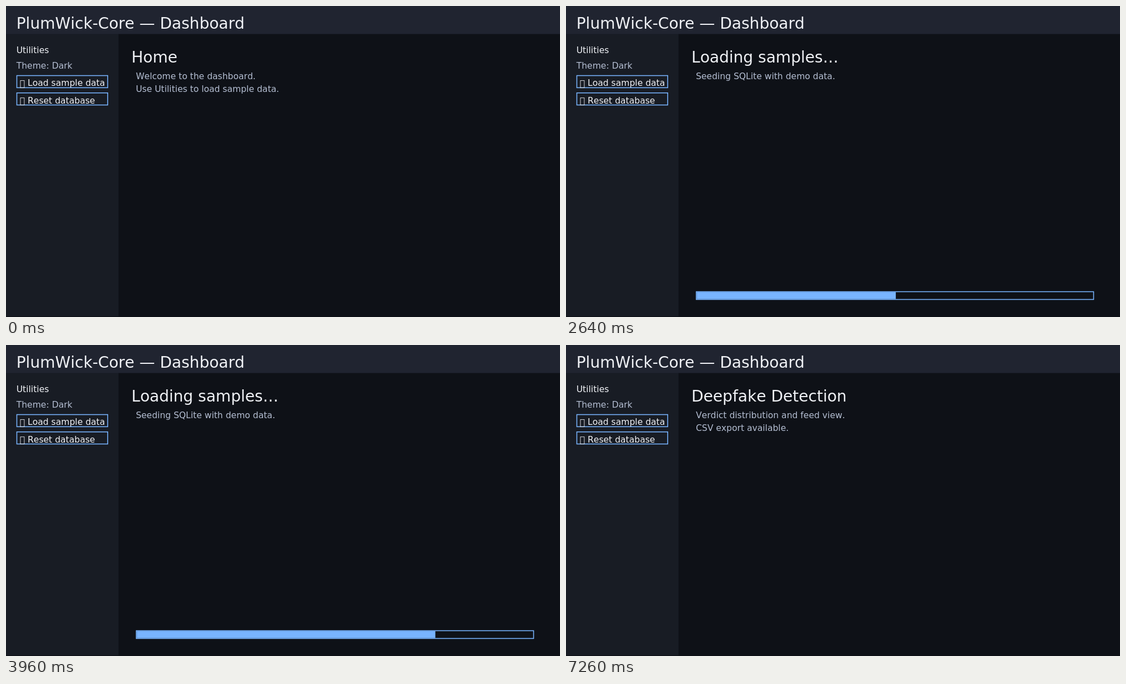
Write an HTML page with a canvas that moves like this. It is 998 px wide and 561 px high and loops after 8 s.

```html
<!DOCTYPE html>
<html lang="en">
<head>
<meta charset="utf-8">
<title>Dashboard</title>
<style>
  html, body { margin: 0; width: 100%; height: 100%; overflow: hidden; background: #0e1117; }
  canvas { display: block; width: 998px; height: 561px; }
</style>
</head>
<body>
<canvas id="stage" width="998" height="561"></canvas>
<script>
const ctx = document.getElementById('stage').getContext('2d');
const LOOP = 8000;
const UNIT = 998 / 640; // layout grid
const BODY = 10 * UNIT, TITLE = 18 * UNIT;
const COLOR = {
  page: '#0e1117', side: '#181c24', head: '#202430',
  text: '#f0f2f6', muted: '#b4bed2', accent: '#78b4ff'
};

const loading = progress => ({
  title: 'Loading samples…', lines: ['Seeding SQLite with demo data.'], progress
});
const scenes = [
  { at: 0, title: 'Home', lines: ['Welcome to the dashboard.', 'Use Utilities to load sample data.'] },
  { at: 1320, ...loading(0.25) },
  { at: 2640, ...loading(0.5) },
  { at: 3960, ...loading(0.75) },
  { at: 5280, title: 'Prompt Injection Tests', lines: ['Risk summary and recent runs.', 'CSV export available.'] },
  { at: 7260, title: 'Deepfake Detection', lines: ['Verdict distribution and feed view.', 'CSV export available.'] }
];

// Boxes are placed in grid units, text in pixels.
function fill(x, y, w, h, color) {
  ctx.fillStyle = color;
  ctx.fillRect(x * UNIT, y * UNIT, w * UNIT, h * UNIT);
}

function outline(x, y, w, h, color, line = 1) {
  ctx.strokeStyle = color;
  ctx.lineWidth = line * UNIT;
  ctx.strokeRect((x + line / 2) * UNIT, (y + line / 2) * UNIT, (w - line) * UNIT, (h - line) * UNIT);
}

function text(str, x, y, size = BODY, color = COLOR.text) {
  ctx.font = `${size}px "DejaVu Sans", sans-serif`;
  ctx.fontKerning = 'none';
  ctx.fillStyle = color;
  ctx.fillText(str, x, y);
}

function button(label, y) {
  outline(12, y, 106, 15, COLOR.accent);
  outline(16.4, y + 6, 5, 8.8, COLOR.text, 0.55); // missing-glyph box
  text(label, 39, y * UNIT + 19.6);
}

function progressBar(part) {
  outline(150, 330, 460, 10, COLOR.accent);
  fill(151, 331, 460 * part, 8, COLOR.accent);
}

function draw(time) {
  const scene = scenes.findLast(s => s.at <= time);
  fill(0, 0, 640, 360, COLOR.page);
  fill(0, 0, 130, 359, COLOR.side);
  fill(0, 0, 640, 32.4, COLOR.head);

  text('PlumWick-Core — Dashboard', 18.7, 40.8, TITLE);
  text('Utilities', 18.7, 85);
  text('Theme: Dark', 18.7, 113, BODY, COLOR.muted);
  button('Load sample data', 80);
  button('Reset database', 100);

  text(scene.title, 226, 101.6, TITLE);
  scene.lines.forEach((line, i) => text(line, 233.9, 131.8 + i * 15 * UNIT, BODY, COLOR.muted));
  if (scene.progress) progressBar(scene.progress);
}

function tick() {
  draw(performance.now() % LOOP);
  requestAnimationFrame(tick);
}
tick();
</script>
</body>
</html>
```
